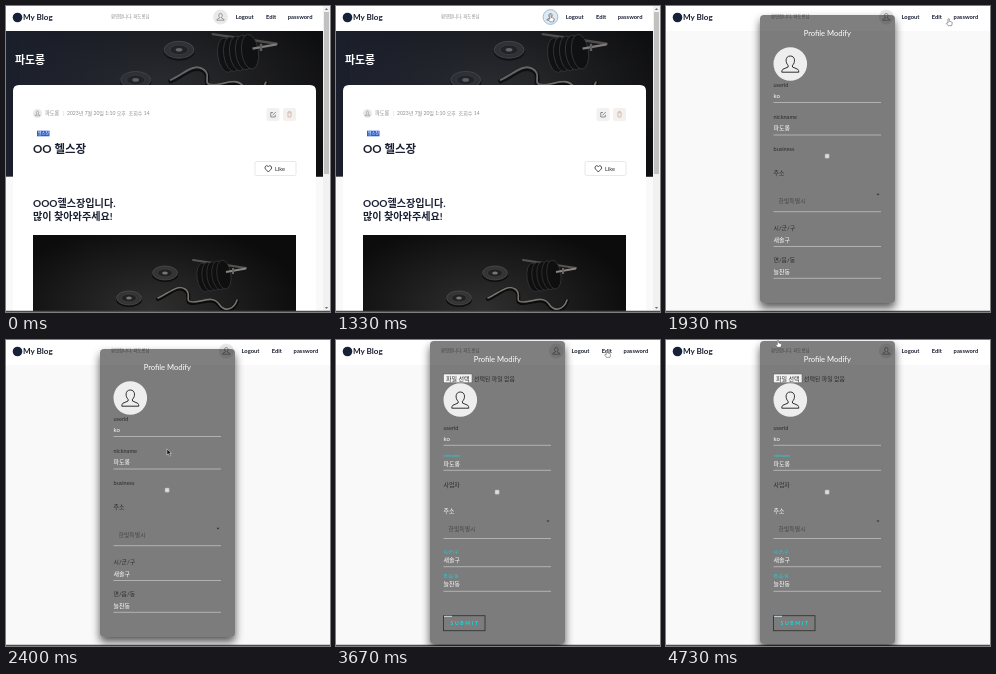
An HTML page that plays this animation: 324x306 px, repeating every 4790 ms.

```html
<!DOCTYPE html>
<html lang="ko">
<head>
<meta charset="utf-8">
<title>My Blog</title>
<style>
html, body { margin: 0; width: 100%; height: 100%; overflow: hidden; background: #fff; }
svg { position: absolute; left: 0; top: 0; width: 324px; height: 306px; overflow: hidden; }
text { font-family: Lato, "Noto Sans CJK KR", "Noto Sans CJK", sans-serif; fill: #1b2133; white-space: pre; }
.b { font-weight: 700; }
.w { fill: #fff; }
.k { fill: #2a2a2a; }
.s { fill: #484848; }
.g { fill: #8b8b8b; }
.c { fill: #15dbe3; }
#panel { position: absolute; left: 94px; width: 135px; border-radius: 4px;
  background: rgba(0, 0, 0, .5); box-shadow: 0 5px 9px rgba(0, 0, 0, .65); }
</style>
</head>
<body>
<svg id="base" viewBox="0 0 324 306">
  <defs>
    <radialGradient id="floor" cx=".45" cy=".5" r=".58">
      <stop offset="0" stop-color="#2f2f30"/>
      <stop offset=".55" stop-color="#1c1c1d"/>
      <stop offset="1" stop-color="#0c0c0d"/>
    </radialGradient>
    <linearGradient id="tint">
      <stop offset="0" stop-color="#252c40" stop-opacity=".6"/>
      <stop offset=".7" stop-color="#1c2232" stop-opacity=".1"/>
    </linearGradient>
    <clipPath id="heroClip"><rect y="25" width="317" height="145.5"/></clipPath>
    <clipPath id="postClip"><rect x="27" y="229" width="263" height="76"/></clipPath>
    <g id="plate">
      <ellipse cy="1.500" rx="13" ry="7.500" fill="#0d0d0e"/>
      <ellipse rx="12.400" ry="7" fill="#343435" stroke="#5a5a5a" stroke-width=".6"/>
      <ellipse rx="7.500" ry="4" fill="#222223" stroke="#4c4c4c" stroke-width=".5"/>
      <ellipse rx="2.800" ry="1.500" fill="#777"/>
    </g>
    <ellipse id="disc" rx="7" ry="14.500" fill="#0f0f10" stroke="#3a3a3c" stroke-width=".7"/>
    <g id="photo">
      <rect width="263" height="146" fill="url(#floor)"/>
      <use href="#plate" x="132" y="38"/>
      <use href="#plate" x="96" y="63"/>
      <g fill="none" stroke-linecap="round">
        <path d="M125 64C136 59 144 50 152 55S150 68 160 68S180 61 186 70S201 75 204 66" stroke="#0b0b0b" stroke-width="4"/>
        <path d="M125 63C136 58 144 49 152 54S150 67 160 67S180 60 186 69S201 74 204 65" stroke="#77736e" stroke-width="1.600"/>
        <path d="M160 25L213 33" stroke="#55534f" stroke-width="2"/>
      </g>
      <g transform="rotate(-8 181 41)">
        <use href="#disc" x="171" y="41"/>
        <use href="#disc" x="176" y="41"/>
        <use href="#disc" x="181" y="41"/>
        <use href="#disc" x="186" y="41"/>
        <use href="#disc" x="191" y="41"/>
      </g>
      <path d="M193 37L213 33.500" stroke="#8a8681" stroke-width="1.800"/>
      <path d="M200 33V39" stroke="#666" stroke-width="2"/>
    </g>
    <g id="person" fill="none" stroke="#252525" stroke-width=".95" stroke-linejoin="round">
      <path d="M0 -8C5.400 -8 5 -1 2.200 1.200V3L7.500 5.300Q8.500 6.200 8.500 8.200H-8.500Q-8.500 6.200 -7.500 5.300L-2.200 3V1.200C-5 -1 -5.400 -8 0 -8Z"/>
    </g>
  </defs>

  <rect width="324" height="306" fill="#f9f9f9"/>
  <g id="post">
    <g clip-path="url(#heroClip)">
      <rect y="25" width="317" height="146" fill="#0d0d0f"/>
      <use href="#photo" transform="translate(14 -2) scale(1.205)"/>
      <rect y="25" width="317" height="146" fill="url(#tint)"/>
    </g>
    <text class="b w" x="9" y="58" font-size="10.900">파도롱</text>
    <path d="M7 306V85Q7 79 13 79H304Q310 79 310 85V306Z" fill="#fff"/>
    <circle cx="31.500" cy="107.500" r="4.500" fill="#e9e9e9"/>
    <use href="#person" transform="translate(31.500 107.500) scale(.28)"/>
    <text class="g" x="39" y="109.400" font-size="5.200">파도롱</text>
    <path d="M57.500 105V110" stroke="#ddd" stroke-width=".6"/>
    <text class="g" x="61" y="109.400" font-size="5.050">2023년 7월 20일 1:10 오후  조회수 14</text>
    <rect x="260.500" y="102" width="13" height="13" rx="2" fill="#f1f1f1"/>
    <rect x="277" y="102" width="13" height="13" rx="2" fill="#f4f0ee"/>
    <g fill="none" stroke="#666" stroke-width=".7">
      <path d="M267 106.500H264.800V111H269.300V108.800M266.500 109.300L269.800 106"/>
      <path d="M281.300 106.700H285.700M282 107V111H285V107M282.700 106V105.500H284.300V106" stroke="#c4aaa2"/>
    </g>
    <rect x="31" y="124.700" width="12.500" height="5.600" fill="#2a5fd0"/>
    <text class="w" x="31.700" y="129.100" font-size="4.100">헬스장</text>
    <text class="b" x="27" y="147.200" font-size="11.500">OO 헬스장</text>
    <rect x="249" y="155.500" width="41" height="14" rx="1.500" fill="#fff" stroke="#e2e2e2" stroke-width=".8"/>
    <path d="M262.300 166L259.500 163.100C257.800 161 260.700 158.200 262.300 160.700C263.900 158.200 266.800 161 265.100 163.100Z" fill="none" stroke="#222" stroke-width=".8"/>
    <text class="k" x="269" y="164.600" font-size="5.700">Like</text>
    <g class="b" font-size="10.100">
      <text x="27" y="200.700">OOO헬스장입니다.</text>
      <text x="27" y="213.600">많이 찾아와주세요!</text>
    </g>
    <g clip-path="url(#postClip)"><use href="#photo" x="27" y="229"/></g>
  </g>

  <rect width="324" height="25" fill="#fff"/>
  <circle cx="11.500" cy="11.500" r="4.800" fill="#17213a"/>
  <text class="b" x="17" y="14.300" font-size="8.100">My Blog</text>
  <text class="g" x="105" y="11.600" font-size="4.400">환영합니다, 파도롱님</text>
  <g id="nav">
    <circle id="avatar" cx="214.500" cy="11" r="7.400" fill="#e9e9e9"/>
    <use href="#person" transform="translate(214.500 10.800) scale(.42)"/>
    <g class="b" font-size="5.800">
      <text x="229.700" y="13.200">Logout</text>
      <text x="260" y="13.200">Edit</text>
      <text x="281.800" y="13.200">password</text>
    </g>
  </g>
  <g id="scrollbar">
    <rect x="317" width="7" height="306" fill="#f1f1f1"/>
    <rect x="318" y="6" width="5" height="162" fill="#c1c1c1"/>
    <path d="M318.800 4L320.500 2L322.200 4ZM318.800 301L320.500 303L322.200 301Z" fill="#777"/>
  </g>
  <path d="M0 305.400H324" stroke="#4a4a4a" stroke-width="1.100"/>
</svg>

<div id="panel"></div>

<svg viewBox="0 0 324 306">
  <g id="formA"></g>
  <g id="formB"></g>
  <g id="arrow">
    <path d="M0 0V6.200L1.500 4.900L2.600 7.300L3.700 6.800L2.700 4.500H4.500Z" fill="#111" stroke="#fff" stroke-width=".5"/>
  </g>
  <g id="hand">
    <path d="M-.7 .7Q0 -.5 .7 .7V3L3.100 3.600Q3.700 3.900 3.500 4.800L3 7.300H-.6L-2.300 5Q-2.100 3.900 -.7 4.700Z" fill="#fff" stroke="#444" stroke-width=".5"/>
  </g>
</svg>

<script>
const LOOP = 4790, STEP = 1000 / 15;
const $ = id => document.getElementById(id);

const label = (x, y, size, str, cls) =>
  `<text x="${x}" y="${y}" font-size="${size}" class="${cls}">${str}</text>`;
const rule = y => `<path d="M107.500 ${y}H215" stroke="#c9c9c9" stroke-width=".7"/>`;
const field = (name, nameY, size, cls, value, valueY, lineY) =>
  label(107.5, nameY, size, name, cls) + label(107.5, valueY, 6, value, 'w') + rule(lineY);
const portrait = y =>
  `<circle cx="124.300" cy="${y}" r="16.800" fill="#eee"/>
   <use href="#person" transform="translate(124.300 ${y})"/>`;
const title = y => `<g text-anchor="middle">${label(161.3, y, 7.6, 'Profile Modify', 'w')}</g>`;
const checkbox = y => `<rect x="159" y="${y}" width="4.200" height="4.200" rx=".7" fill="#dcdcdc" stroke="#aaa" stroke-width=".5"/>`;
const region = (nameY, cls, valueY, lineY) =>
  label(107.5, nameY, 5.9, '주소', cls) + label(112.5, valueY, 5.9, '한빛특별시', 's') +
  `<path d="M210.500 ${lineY - 18}h3l-1.500 1.800Z" fill="#333"/>` + rule(lineY);

$('formA').innerHTML = title(29.7) + portrait(58) +
  field('userid', 81, 5.6, 'k', 'ko', 92, 96.5) +
  field('nickname', 113, 5.6, 'k', '파도롱', 124, 129) +
  label(107.5, 145, 5.6, 'business', 'k') + checkbox(148) +
  region(169, 'k', 196.5, 205.7) +
  field('시/군/구', 224.3, 5.9, 'k', '새솔구', 235.7, 240.5) +
  field('면/읍/동', 256.3, 5.9, 'k', '늘찬동', 267.5, 272.3);

$('formB').innerHTML = title(22.3) +
  '<rect x="107.500" y="34" width="28.500" height="8.800" fill="#f4f4f4" stroke="#555" stroke-width=".5"/>' +
  label(110, 40.5, 6, '파일 선택', 'k') + label(138, 40.5, 5.9, '선택된 파일 없음', 'k') +
  portrait(60) +
  field('userid', 90, 5.6, 'k', 'ko', 101, 105.3) +
  field('nickname', 116.6, 4, 'c', '파도롱', 125.5, 130.3) +
  label(107.5, 146.7, 5.9, '사업자', 'k') + checkbox(150) +
  region(173, 'w', 190.5, 198.5) +
  field('시/군/구', 213.5, 4.1, 'c', '새솔구', 221.8, 226.7) +
  field('면/읍/동', 238.3, 4.1, 'c', '늘찬동', 246.2, 251.3) +
  '<rect x="107.500" y="275.700" width="41.500" height="15" fill="none" stroke="#333" stroke-width=".9"/>' +
  '<path id="spark" d="M108 276.300H116" stroke="#d8eeee" stroke-width=".9"/>' +
  `<g font-weight="700" letter-spacing="1.700">${label(114.5, 285, 5, 'SUBMIT', 'c')}</g>`;

// Pointer stops: time, x, y
const stops = [
  [270, 284, 158], [470, 32, 203], [600, 90, 90], [730, 291, 12],
  [800, 293, 10], [930, 170, 205], [1070, 13, 56], [1200, 214, 8], [1470, 215, 9],
  [1930, 283, 12], [2070, 240, 60], [2270, 150, 116], [2400, 161, 109], [2470, 150, 92],
  [2600, 120, 86], [3000, 283, 12], [3130, 266, 18], [3330, 275.5, 10], [3530, 271, 10],
  [3670, 271, 10], [3870, 215, 150], [4130, 144, 280], [4200, 138, 240], [4470, 112, 0], [LOOP, 112, 0]
];

function pointerAt(t) {
  const i = Math.max(1, stops.findIndex(s => s[0] > t));
  const [t0, x0, y0] = stops[i - 1], [t1, x1, y1] = stops[i];
  const u = Math.min(1, Math.max(0, (t - t0) / (t1 - t0)));
  const e = u * u * (3 - 2 * u);
  return [x0 + (x1 - x0) * e, y0 + (y1 - y0) * e];
}

const show = (id, on) => $(id).style.display = on ? '' : 'none';

function render(now) {
  // The picture advances fifteen times a second, on times rounded to 10 ms
  const t = Math.floor((now % LOOP + 4) / STEP) * STEP + 4;
  const modal = t >= 1470, scrolled = t >= 3670;

  show('post', !modal);
  show('scrollbar', !modal);
  show('panel', modal);
  show('formA', modal && !scrolled);
  show('formB', scrolled);
  $('panel').style.top = scrolled ? '1px' : '9px';
  $('panel').style.height = scrolled ? '303px' : '288px';
  $('nav').setAttribute('transform', `translate(${modal ? 5.8 : 0} 0)`);

  const hover = t >= 1330 && !modal;
  $('avatar').setAttribute('fill', hover ? '#dfe9f1' : '#e9e9e9');
  $('avatar').setAttribute('stroke', hover ? '#9dbfda' : 'none');
  $('spark').setAttribute('transform', `translate(${t >= 4670 && t < 4730 ? 15 : 0} 0)`);

  const [x, y] = pointerAt(t);
  const hand = y < 20 || y > 272;
  show('hand', t >= 270 && hand);
  show('arrow', t >= 270 && !hand);
  $(hand ? 'hand' : 'arrow').setAttribute('transform', `translate(${x} ${y})`);
}

function tick() {
  render(performance.now());
  requestAnimationFrame(tick);
}
tick();
</script>
</body>
</html>
```
